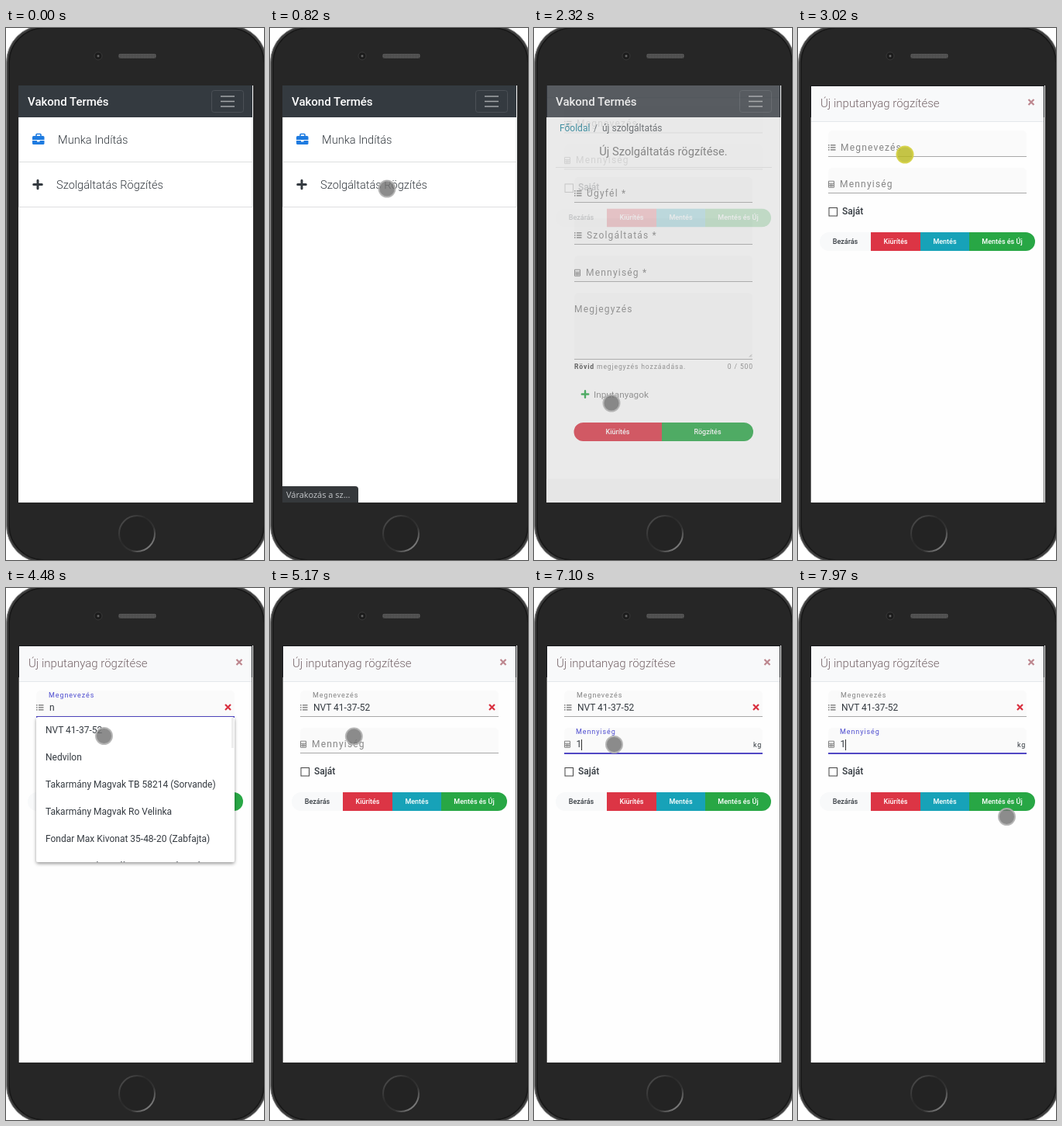
Animation, 333 px wide and 685 px high, one loop 8 s. Source, as an HTML page:

```html
<!DOCTYPE html>
<html lang="hu">
<head>
<meta charset="utf-8">
<title>Új szolgáltatás</title>
<style>
  html, body { margin: 0; width: 100%; height: 100%; overflow: hidden; background: #fff; }
  svg { display: block; width: 100%; height: 100%; }
  text { font-family: Roboto, sans-serif; font-size: 12px; fill: #343a40; white-space: pre; }
  .light { font-weight: 300; }
  .mid { font-weight: 500; }
  .item { font-size: 14.6px; font-weight: 300; }
  .label { letter-spacing: .1em; fill: #858585; }
  .note { font-size: 8.6px; }
  .button { font-size: 9px; font-weight: 500; fill: #fff; text-anchor: middle; }
</style>
</head>
<body>
<svg viewBox="0 0 333 685">
  <defs>
    <linearGradient id="ring" x1="0" y1="0" x2="1" y2="1">
      <stop offset="0" stop-color="#555"/><stop offset=".4" stop-color="#2a2a2a"/>
      <stop offset=".65" stop-color="#333"/><stop offset="1" stop-color="#aaa"/>
    </linearGradient>
    <pattern id="mesh" width="2" height="2" patternUnits="userSpaceOnUse">
      <rect width="2" height="2" fill="#484848"/><rect width="1" height="1" fill="#6a6a6a"/>
    </pattern>
    <filter id="shadow" x="-10%" y="-10%" width="120%" height="120%">
      <feDropShadow dx="0" dy="2" stdDeviation="2" flood-opacity=".4"/>
    </filter>
    <clipPath id="screen"><rect x="16" y="74" width="303" height="537"/></clipPath>
    <clipPath id="menuClip"><rect x="39" y="166" width="256" height="187"/></clipPath>
    <clipPath id="formPill"><rect x="51.5" y="508" width="231.5" height="24" rx="12"/></clipPath>
    <clipPath id="modalPill"><rect x="28" y="263" width="278" height="24" rx="12"/></clipPath>
    <g id="list" stroke-width="1.2" stroke="#6c6c6c">
      <path d="M0 1.2h1.6M0 4.2h1.6M0 7.2h1.6M3 1.2h6.5M3 4.2h6.5M3 7.2h6.5"/>
    </g>
    <g id="calc" fill="none" stroke="#808080">
      <path d="M.5 .5h7v8h-7zM1 3.5h6M1 6h6M3 4v4M5 4v4"/>
    </g>
    <path id="plus" d="M-5.3 0h10.6M0 -5.3v10.6" stroke-width="3" stroke-linecap="round"/>
  </defs>

  <!-- phone -->
  <rect x=".5" y="-3.5" width="336" height="692" rx="48" fill="#3c3c3c" stroke="#8d8d8d"/>
  <rect x="4" y="0" width="329" height="685" rx="45" fill="#262626" stroke="#171717" stroke-width="1.5"/>
  <circle cx="119" cy="36" r="5" fill="#1c1c1c" stroke="#383838"/>
  <circle cx="119" cy="36" r="1.5" fill="#666"/>
  <rect x="145" y="33" width="49" height="6" rx="3" fill="url(#mesh)"/>
  <circle cx="169" cy="651" r="23" fill="#232323" stroke="url(#ring)" stroke-width="2"/>

  <g clip-path="url(#screen)">
    <rect x="16" y="74" width="303" height="537" fill="#fff"/>
    <rect x="16" y="74" width="302" height="41" fill="#343a40"/>
    <text class="mid" x="28" y="100" style="font-size:15px;fill:#fff">Vakond Termés</text>
    <rect x="265.5" y="80.5" width="41" height="28" rx="3" fill="none" stroke="#4b5056"/>
    <path d="M277 88h18M277 94.5h18M277 101h18" stroke="#a3a6a9" stroke-width="1.4"/>

    <g id="home">
      <path d="M16.5 115v115.500h301.500v-115.500M16 172.500h302" fill="none" stroke="#dedfe0"/>
      <path d="M39 139v-1.500q0-1 1-1h4q1 0 1 1v1.500" fill="none" stroke="#1e7be0" stroke-width="1.6"/>
      <path d="M35.500 139h12.500q1.500 0 1.500 1.500v3.500h-15.500v-3.500q0-1.500 1.500-1.500zM34 145h6v1.500h3.500v-1.500h6v3.500q0 1.500-1.500 1.500h-12.500q-1.500 0-1.500-1.500z" fill="#1e7be0"/>
      <use href="#plus" x="41" y="201.500" stroke="#343a40"/>
      <text class="item" x="67" y="149">Munka Indítás</text>
      <text class="item" x="65" y="207">Szolgáltatás Rögzítés</text>
    </g>

    <g id="form">
      <text x="33" y="133" style="fill:#17829b">Főoldal</text>
      <text x="77" y="133" style="fill:#6c757d">/</text>
      <text x="88" y="133" style="fill:#555b60">új szolgáltatás</text>
      <text x="167" y="164" text-anchor="middle" style="font-size:14.7px;fill:#757575">Új Szolgáltatás rögzítése.</text>
      <path d="M28 179.500h279" stroke="#e6e6e6"/>
      <g id="formFields"></g>
      <text class="label note" x="52" y="439"><tspan font-weight="700" fill="#444">Rövid</tspan> megjegyzés hozzáadása.</text>
      <text class="label note" x="283" y="439" text-anchor="end">0 / 500</text>
      <path d="M278 423.500l3-3M280 423.500l1-1" stroke="#888" stroke-width=".8"/>
      <use href="#plus" transform="translate(66 471.500) scale(.8)" stroke="#28a745"/>
      <text x="77" y="476" style="font-size:11.8px;fill:#858585">Inputanyagok</text>
      <g clip-path="url(#formPill)" id="formButtons"></g>
    </g>

    <rect id="backdrop" x="16" y="74" width="302" height="537"/>
    <g id="modal">
      <rect x="17" y="75" width="300" height="536" fill="#fefefe"/>
      <rect x="17" y="75" width="300" height="45" fill="#f8f9fa"/>
      <path d="M17 120.500h300" stroke="#e4e8ec"/>
      <path d="M16.500 611v-536.500h301v536.500" fill="none" stroke="#000" stroke-opacity=".2"/>
      <text class="light" x="29" y="102" style="font-size:15px;fill:#756468">Új inputanyag rögzítése</text>
      <path d="M297.500 92l7 7m0-7l-7 7" stroke="#bd868e" stroke-width="2.200"/>
      <g id="modalFields"></g>
      <text id="name" x="56" y="158"></text>
      <path id="clear" d="M283 150l7 7m0-7l-7 7" stroke="#d9303f" stroke-width="2.200"/>
      <text id="amount" x="54.500" y="205"></text>
      <text id="unit" x="283" y="205" style="font-size:9px;letter-spacing:.1em">kg</text>
      <path id="focusLine" stroke="#5148c4" stroke-width="2"/>
      <rect x="40" y="231.500" width="10.500" height="10.500" fill="#fff" stroke="#444"/>
      <text class="mid" x="57" y="240">Saját</text>
      <g clip-path="url(#modalPill)" id="modalButtons"></g>
      <g id="menu">
        <rect x="39" y="166" width="256" height="187" rx="3" fill="#fff" filter="url(#shadow)"/>
        <g id="options" clip-path="url(#menuClip)"></g>
        <rect x="291" y="167" width="3" height="39" fill="#ededed"/>
      </g>
      <rect id="caret" width="1" height="14" fill="#333"/>
    </g>
    <g id="status">
      <path d="M16 590h94q4 0 4 4v17h-98z" fill="#35383b"/>
      <text x="21" y="605" style="font-family:'Open Sans',sans-serif;font-size:11px;fill:#c3c6c9">Várakozás a sz...</text>
    </g>
  </g>
  <rect id="popup" x="56.500" y="259.500" width="290" height="234" fill="#fff" stroke="#d0d0d0"/>
  <circle id="cursor" r="10.500" stroke-width="2"/>
</svg>
<script>
const LOOP = 8000;
const $ = id => document.getElementById(id);
const show = (id, on) => $(id).style.display = on ? '' : 'none';
const add = (id, markup) => $(id).insertAdjacentHTML('beforeend', markup);
const within = (t, a, b) => t >= a && t < b;
const progress = (t, start, length) => {
  const p = Math.min(1, Math.max(0, (t - start) / length));
  return 1 - (1 - p) ** 3;
};

function field(id, x, right, top, bottom, label, icon, labelId = '') {
  const base = icon ? bottom - 8.3 : top + 24.5;
  const textX = x + (icon === 'list' ? 16 : icon ? 15 : 0);
  add(id, `<path d="M${x} ${bottom}V${top + 6}q0-6 6-6H${right - 6}q6 0 6 6V${bottom}z" fill="#fafafa"/>
    <path d="M${x} ${bottom - .5}H${right}" stroke="#a8a8a8"/>
    ${icon ? `<use href="#${icon}" x="${x}" y="${base - 8}"/>` : ''}
    <g transform="translate(${textX} ${base})"><text id="${labelId}" class="label">${label}</text></g>`);
}

function buttons(id, x, y, items) {
  for (const [label, width, color, ink = '#fff'] of items) {
    add(id, `<rect x="${x}" y="${y}" width="${width}" height="24" fill="${color}"/>
      <text class="button" x="${x + width / 2}" y="${y + 15}" style="fill:${ink}">${label}</text>`);
    x += width;
  }
}

field('formFields', 52, 282, 192, 225, 'Ügyfél *', 'list');
field('formFields', 52, 282, 245, 279, 'Szolgáltatás *', 'list');
field('formFields', 52, 282, 293, 327, 'Mennyiség *', 'calc');
field('formFields', 52, 282, 341, 427, 'Megjegyzés');
buttons('formButtons', 51, 508, [['Kiürítés', 114, '#dc3545'], ['Rögzítés', 118, '#28a745']]);

field('modalFields', 39, 295, 132, 166, 'Megnevezés', 'list', 'nameLabel');
field('modalFields', 39, 295, 180, 213, 'Mennyiség', 'calc', 'amountLabel');
buttons('modalButtons', 28, 263, [
  ['Bezárás', 66, '#f8f9fa', '#343a40'], ['Kiürítés', 64, '#dc3545'],
  ['Mentés', 63, '#17a2b8'], ['Mentés és Új', 85, '#28a745']]);

const product = 'NVT 41-37-52';
[product, 'Nedvilon', 'Takarmány Magvak TB 58214 (Sorvande)', 'Takarmány Magvak Ro Velinka',
  'Fondar Max Kivonat 35-48-20 (Zabfajta)', 'Vegyes magkeverék tavaszi vetésre, új']
  .forEach((name, i) => add('options', `<text x="51" y="${187 + 35 * i}">${name}</text>`));

// time, x, y
const path = [
  [150, 165, 700], [700, 151, 207], [980, 151, 207], [1390, 140, 182], [1540, 140, 182],
  [1640, 123.5, 241.5], [2050, 100, 483], [2400, 100, 483], [2950, 138, 163], [4090, 138, 163],
  [4480, 126.5, 190.5], [4700, 110, 184], [4950, 110, 184], [5450, 106, 201], [5730, 106, 201],
  [5950, 103.5, 201.5], [7360, 103.5, 201.5], [7600, 240, 322], [7760, 296, 315], [7960, 269.5, 294.5]];
const clicks = [[720, 800], [2200, 2310], [2980, 3120], [4780, 4880], [5390, 5480]];

function cursorAt(t) {
  const i = path.findIndex(p => p[0] > t);
  if (i < 0) return path.at(-1).slice(1);
  if (i === 0) return path[0].slice(1);
  const [t0, x0, y0] = path[i - 1], [t1, x1, y1] = path[i];
  const p = (t - t0) / (t1 - t0), e = p * p * (3 - 2 * p);
  // passes through several points keep their speed
  const k = within(t, 1540, 2050) || t > 7360 ? p : e;
  return [x0 + (x1 - x0) * k, y0 + (y1 - y0) * k];
}

function floatLabel(id, t, start, focused) {
  const p = progress(t, start, 150);
  $(id).setAttribute('transform', `translate(0 ${-17 * p}) scale(${1 - .25 * p})`);
  $(id).style.fill = focused ? '#504fd0' : '';
}

const NAME = 3160, TYPE = 3810, PICK = 4850, AMOUNT = 5480, DIGIT = 6850;

function render(t) {
  show('home', t < 910);
  show('form', t >= 910);
  show('status', within(t, 780, 1250));

  const open = progress(t, 2300, 300);
  show('modal', t >= 2300);
  $('modal').style.opacity = open;
  $('modal').setAttribute('transform', `translate(0 ${-38 * (1 - open)})`);
  $('backdrop').style.opacity = .5 * open;

  const onName = within(t, NAME, PICK + 50), onAmount = t >= AMOUNT;
  floatLabel('nameLabel', t, NAME, onName);
  floatLabel('amountLabel', t, AMOUNT, onAmount);
  $('name').textContent = t < TYPE ? '' : t < PICK ? 'n' : product;
  $('amount').textContent = t < DIGIT ? '' : '1';
  show('clear', t >= TYPE);
  show('unit', onAmount);

  const half = 128 * progress(t, onAmount ? AMOUNT : NAME, 180);
  show('focusLine', onAmount || onName);
  $('focusLine').setAttribute('d', `M${167 - half} ${onAmount ? 213 : 166}H${167 + half}`);

  const menu = Math.min(1, Math.max(0, (t - TYPE + 30) / 100)) * Math.min(1, Math.max(0, (PICK + 40 - t) / 40));
  show('menu', within(t, TYPE, PICK + 40));
  $('menu').style.opacity = menu;

  const since = [DIGIT, AMOUNT, TYPE, NAME].find(s => t >= s);
  show('caret', (onAmount || within(t, NAME, PICK)) && Math.floor((t - since) / 505) % 2 === 0);
  $('caret').setAttribute('x', t >= DIGIT ? 61 : onAmount ? 54.5 : t >= TYPE ? 63 : 56);
  $('caret').setAttribute('y', onAmount ? 195 : 148);

  show('popup', within(t, 6870, 7100));

  const [x, y] = cursorAt(t), pressed = clicks.some(([a, b]) => within(t, a, b));
  const cursor = $('cursor');
  cursor.setAttribute('cx', x);
  cursor.setAttribute('cy', y);
  cursor.setAttribute('fill', pressed ? 'rgba(184,184,30,.82)' : 'rgba(115,115,115,.82)');
  cursor.setAttribute('stroke', pressed ? 'rgba(212,208,66,.9)' : 'rgba(178,178,178,.9)');
}

const start = performance.now();
function tick() {
  render((performance.now() - start) % LOOP);
  requestAnimationFrame(tick);
}
tick();
</script>
</body>
</html>
```
